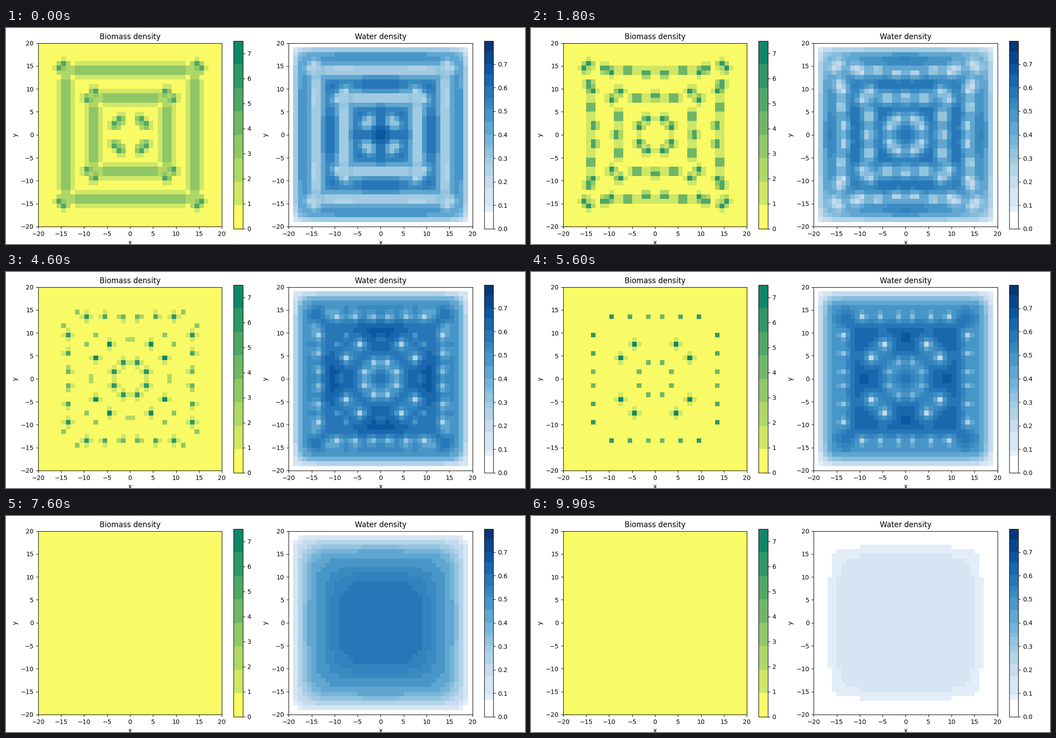
A matplotlib script for the animation above (10 s loop, 1159 px wide and 483 px high).

```python
import numpy as np
import matplotlib.pyplot as plt
from matplotlib.animation import FuncAnimation
from matplotlib.colors import BoundaryNorm, ListedColormap

W, H, DPI = 1159, 483, 100
FRAMES, INTERVAL = 100, 100
HALF = 20            # cells from the centre to the border
DIFFUSION = 12       # spread of water between neighbouring cells
COLLAPSE = 5.6       # seconds until the last plants start to die
DEATH_RATE = 4.4

# One quadrant of cell centres; the rest follows by symmetry.
X, Y = np.meshgrid(np.arange(HALF) + 0.5, np.arange(HALF) + 0.5)
NEAR, FAR = np.minimum(X, Y), np.maximum(X, Y)


def bands(level):
    """Two square stripes, thinner towards their corners."""
    field = np.zeros_like(X)
    for middle in (8, 14):
        stripe = 4.2 * level * np.exp(-(FAR - middle) ** 2 / 1.94)
        corner = NEAR > middle - 2.5
        field = np.maximum(field, np.where(corner, 0.7 * level, 1) * stripe)
    return field


def clumps(points, peaks, width):
    """Round tufts, mirrored at the diagonal."""
    field = np.zeros_like(X)
    for (u, v), peak in zip(points, np.broadcast_to(peaks, len(points))):
        for a, b in ((u, v), (v, u)):
            r2 = (X - a) ** 2 + (Y - b) ** 2
            field = np.maximum(field, peak * np.exp(-r2 / (2 * width ** 2)))
    return field


SURVIVORS = [(1.5, 13.5), (5.5, 13.5), (9.5, 13.5), (4.5, 7.5), (1.5, 3.5)]
STRENGTH = np.array([4.5, 5.1, 5.9, 7.3, 4.3])


def survivors(age):
    peaks = np.maximum(STRENGTH - DEATH_RATE * age, 0)
    return clumps(SURVIVORS, peaks, 0.52)


# Stripes break into beads, beads shrink to spots, and few spots survive.
STRIPES = np.maximum(bands(1), clumps(
    [(14.4, 15.2), (7.8, 9.3), (2.2, 3.2)], 5.4, 0.8))
BEADS = np.maximum(bands(0.5), clumps(
    [(14.5, 15.4), (11, 14.4), (9.7, 13.7), (6, 14), (2, 13.4),
     (0, 8.3), (4, 8), (7.7, 9.4), (1.8, 3.4)], 6.4, 0.7))
SPOTS = clumps(
    [(11.4, 14.4), (9.6, 13.5), (5.8, 13.8), (2, 13.4),
     (0, 8.4), (4.3, 7.5), (7.6, 9.4), (1.5, 3.5)], 7.3, 0.55)

TIMES = [0, 1.8, 3.4, COLLAPSE]
STAGES = [STRIPES, BEADS, SPOTS, survivors(0)]


def biomass_at(t):
    if t >= COLLAPSE:
        return survivors(t - COLLAPSE)
    i = np.searchsorted(TIMES, t, side="right") - 1
    mix = (t - TIMES[i]) / (TIMES[i + 1] - TIMES[i])
    field = (1 - mix) * STAGES[i] + mix * STAGES[i + 1]
    thin_cover = 0.7 * (1 - t / COLLAPSE)
    return np.maximum(field, thin_cover)


def laplacian(n):
    """Mirror at the centre, dry border outside."""
    line = -2 * np.eye(n) + np.eye(n, k=1) + np.eye(n, k=-1)
    line[0, 0] = -1
    return np.kron(line, np.eye(n)) + np.kron(np.eye(n), line)


INNER = HALF - 1
SPREAD = DIFFUSION * laplacian(INNER)


def water_at(t, biomass):
    """Balance of rain, evaporation, uptake by plants and diffusion."""
    rain = 2 * (1 - t / 10) + 0.11
    loss = 1 + biomass[:INNER, :INNER].ravel() ** 2
    level = np.linalg.solve(np.diag(loss) - SPREAD, np.full(INNER ** 2, rain))
    return np.pad(level.reshape(INNER, INNER), (0, 1))


def unfold(quadrant):
    right = np.vstack([quadrant[::-1], quadrant])
    return np.hstack([right[:, ::-1], right])


def banded(name, bounds, lowest):
    bounds = np.asarray(bounds)
    middles = (bounds[:-1] + bounds[1:]) / 2 / bounds[-1]
    colors = [tuple(c) for c in plt.get_cmap(name)(middles)]
    colors[0] = lowest
    return ListedColormap(colors), BoundaryNorm(bounds, len(colors))


def pixel_axes(left, top, width, height):
    return fig.add_axes([left / W, 1 - (top + height) / H,
                         width / W, height / H])


def panel(left, title, scale, bar_left, ticks, fmt):
    ax = pixel_axes(left, 33.5, 410.4, 410.4)
    cmap, norm = scale
    image = ax.imshow(np.zeros((2 * HALF, 2 * HALF)), cmap=cmap, norm=norm,
                      origin="lower", extent=(-HALF, HALF, -HALF, HALF),
                      interpolation="nearest", aspect="auto")
    ax.set(title=title, xlabel="x", ylabel="y",
           xticks=range(-20, 21, 5), yticks=range(-20, 21, 5))
    bar = fig.colorbar(image, cax=pixel_axes(bar_left, 28.7, 20.6, 420.2),
                       spacing="proportional", ticks=ticks, format=fmt)
    bar.minorticks_off()
    return image


fig = plt.figure(figsize=(W / DPI, H / DPI), dpi=DPI, facecolor="white")
GREENS = banded("summer_r", np.linspace(0, 7.5, 9), (0.98, 0.988, 0.4, 1))
BLUES = banded("Blues", [0, .072, .095, .173, .227, .273, .303, .339, .358,
                         .40, .455, .51, .535, .555, .605, .655, .70, .755,
                         .799], (1, 1, 1, 1))
plants = panel(71.7, "Biomass density", GREENS, 508.2, np.arange(8), "%d")
moisture = panel(631.2, "Water density", BLUES, 1067.6,
                 np.arange(8) / 10, "%.1f")


def update(frame):
    t = frame * INTERVAL / 1000
    biomass = biomass_at(t)
    plants.set_data(unfold(biomass))
    moisture.set_data(unfold(water_at(t, biomass)))
    return plants, moisture


anim = FuncAnimation(fig, update, frames=FRAMES, interval=INTERVAL,
                     repeat=True, repeat_delay=0)
plt.show()
```
